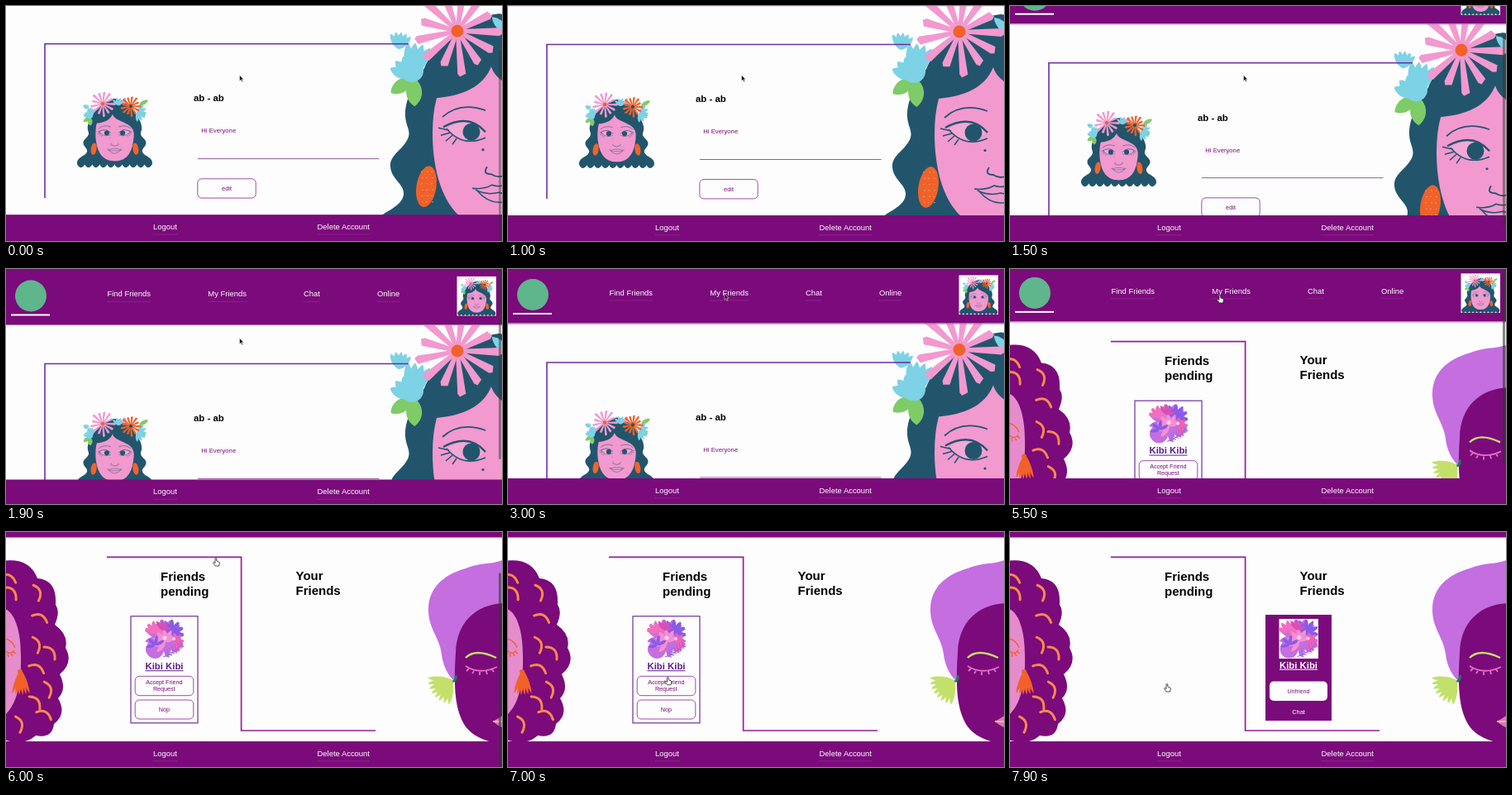
These frames come from a looping animation (600 px wide and 284 px high, 8 s). An HTML page:

```html
<!DOCTYPE html>
<html lang="en">
<head>
<meta charset="utf-8">
<title>Profile and friends</title>
<style>
html, body { margin: 0; width: 100%; height: 100%; overflow: hidden; background: #fdfdfd; }
svg { display: block; width: 600px; height: 284px; }
text { font-family: "Liberation Sans", Arial, sans-serif; white-space: pre; }
</style>
</head>
<body>
<svg id="stage" viewBox="0 0 600 284"></svg>
<script>
const PURPLE = '#7b0a7b', NAVY = '#22556c', PINK = '#f299cf', BLUE = '#7dd2e5',
  GREEN = '#7fcb68', ORANGE = '#f1612a', LINE = '#6f2da3', LILAC = '#c46ee0', LIME = '#c3e06b';
const PROFILE_MAX = 66.5, FRIENDS_MAX = 59.5;

// --- markup helpers ---
const rect = (x, y, w, h, fill, more = '') =>
  `<rect x="${x}" y="${y}" width="${w}" height="${h}" fill="${fill}" ${more}/>`;
const circle = (x, y, r, fill) => `<circle cx="${x}" cy="${y}" r="${r}" fill="${fill}"/>`;
const path = (d, fill) => `<path d="${d}" fill="${fill}"/>`;
const stroke = (d, color, w = 1, more = '') =>
  `<path d="${d}" fill="none" stroke="${color}" stroke-width="${w}" ${more}/>`;
const text = (x, y, s, size, fill, more = '') =>
  `<text x="${x}" y="${y}" font-size="${size}" fill="${fill}" ${more}>${s}</text>`;
const group = (transform, body, more = '') => `<g transform="${transform}" ${more}>${body}</g>`;
const bold = 'font-weight="700"', mid = 'text-anchor="middle"';
const button = (x, y, w, h) =>
  rect(x, y, w, h, 'none', 'rx="5" stroke="#963a9c" stroke-width=".9"');
const times = (n, f) => Array.from({ length: n }, (_, i) => f(i)).join('');

// Ribbon petals around a centre
const daisy = (x, y, n, r, w, fill) => times(n, i => {
  const len = r * (0.94 + 0.09 * Math.sin(i * 2.4));
  return group(`translate(${x} ${y}) rotate(${i * 360 / n + 8})`,
    path(`M-2 0L${-w / 2} ${-len + 3}L${w / 4} ${-len}L${w / 2} ${-len + 4}L2 0Z`, fill));
});
// Pointed petal or leaf growing from (x, y)
const leaf = (x, y, angle, len, w, fill) => group(`translate(${x} ${y}) rotate(${angle})`,
  path(`M0 0C${-w} ${-len * .3} ${-w * .8} ${-len * .8} 0 ${-len}C${w * .8} ${-len * .8} ${w} ${-len * .3} 0 0Z`, fill));
const fan = (x, y, from, to, n, len, w, fill) =>
  times(n, i => leaf(x, y, from + (to - from) * i / (n - 1), len, w, fill));

// --- woman with the flower crown ---
const eye =
  stroke('M528 135Q549 116 580 127', NAVY, 1.8) +
  path('M533 149Q560 131 580 152Q556 174 533 149Z', '#f3a8d6') +
  stroke('M529 147Q560 130 580 153', NAVY, 2.4) +
  stroke('M533 149Q552 172 580 160M536 151l-13 -3M537 154l-11 3M540 157l-8 7M545 161l-5 7', NAVY, 1.5) +
  circle(563, 153, 10.5, NAVY);
const mirror = body => group('translate(1192 0) scale(-1 1)', body);
const earring = `<ellipse cx="508.5" cy="219" rx="12" ry="25" fill="${ORANGE}" transform="rotate(9 508.5 219)"/>` +
  times(18, i => circle(503 + i % 3 * 6 + (i % 2), 201 + Math.floor(i / 3) * 7.3, .7, '#ffb184'));
const woman =
  path('M596 10C560 14 516 48 506 76C496 92 482 112 483 134C484 148 492 153 484 165C476 177 464 182 465 195C466 210 482 216 481 228C480 240 466 246 457 252C444 260 436 270 440 284' +
    times(10, () => 'q14 26 31.2 0') +
    'C756 270 748 260 735 252C726 246 712 240 711 228C710 216 726 210 727 195C728 182 716 177 708 165C700 153 708 148 709 134C710 112 696 92 686 76C676 48 632 14 596 10Z', NAVY) +
  path('M516 155Q516 130 521 112C562 108 579 93 587 74C598 110 674 104 676 155C676 190 668 232 644 254C626 268 612 270 596 270C580 270 566 268 548 254C524 232 516 190 516 155Z', PINK) +
  eye + mirror(eye) + circle(577, 174.5, 1.6, NAVY) +
  stroke('M582 195Q576 204 587 204Q596 210 605 204Q616 204 610 195', NAVY, 1.8) +
  stroke('M564 221Q578 223 588 217Q596 220 604 217Q614 223 628 221M570 224Q582 238 596 238Q610 238 622 224M568 223Q582 230 596 226Q610 230 624 223', NAVY, 1.5) +
  earring + mirror(earring) +
  fan(475, 53, -28, 45, 5, 21, 5, BLUE) +
  leaf(492, 88, 236, 32, 12, GREEN) + leaf(493, 87, 178, 35, 14, GREEN) +
  fan(490, 88, -65, -20, 3, 28, 9, BLUE) + fan(490, 88, -6, 32, 4, 43, 9, BLUE) + circle(491, 79, 14, BLUE) +
  fan(612, 38, -45, 45, 4, 34, 8, BLUE) + leaf(632, 34, 15, 30, 11, PINK) +
  leaf(698, 36, 62, 42, 12, GREEN) + leaf(690, 66, 110, 38, 13, GREEN) +
  fan(690, 66, 40, 180, 6, 40, 10, BLUE) +
  daisy(663, 41, 13, 44, 9, ORANGE) + circle(663, 41, 7, NAVY) +
  daisy(546, 31, 13, 54, 10, PINK) + circle(546, 31, 7.5, ORANGE);

// --- leafy avatar, 47 x 47 ---
const leafy =
  circle(12, 36, 11, LILAC) + fan(24, 22, -160, 170, 12, 24, 6, LILAC) +
  fan(12, 16, -70, 120, 7, 15, 4, '#f06fc0') + fan(32, 16, -60, 130, 7, 17, 4, '#8a5be8') +
  fan(25, 27, -140, 60, 7, 16, 4, '#f58fd2') + fan(36, 28, 0, 190, 6, 12, 4, '#ef62b8') +
  fan(20, 12, -30, 80, 4, 12, 3, '#d94fb4') + fan(13, 31, -100, 60, 4, 12, 3, '#8a5be8') +
  circle(24, 22, 2.5, '#ffd3ec') + circle(35, 23, 2, '#ffd3ec') +
  stroke('M22 45Q36 41 46 28', '#8a5be8', 1) +
  times(7, i => stroke(`M${25 + i * 3} ${44 - i * 2.1}l-1 -6m1 6l5 1`, '#9b6bea', 1.1));

// --- shared header and footer ---
const navLink = (x, w, y, label) => text(x, y, label, 9.45, '#fff') +
  stroke(`M${x} ${y + 6}h${w}`, '#a04aa0', .8, 'stroke-dasharray="1 1"');
const header = rect(0, -10, 600, 75.5, PURPLE) + rect(0, 65.5, 600, 1.2, '#b77ab9') +
  circle(30, 31, 19, '#5fb58c') + rect(6, 53, 47, 2, '#fff') +
  navLink(122.5, 52.5, 32, 'Find Friends') + navLink(244.3, 47, 32, 'My Friends') +
  navLink(360, 20, 32, 'Chat') + navLink(449, 28, 32, 'Online') +
  `<rect id="hover" x="244" y="36.6" width="47" height="1.5" fill="#fff"/>` +
  rect(545.5, 7.5, 47.5, 47.5, '#fff') + group('translate(481.7 11.5) scale(.147)', woman);
const footer = rect(0, 253, 600, 40, PURPLE) +
  navLink(178, 29, 270.8, 'Logout') + navLink(376.5, 63.5, 270.8, 'Delete Account');

// --- profile page ---
const profile = woman +
  stroke('M487 46.5H47V233', LINE, 1.6) +
  group(`translate(${117 - 546 / 3.45} ${119 - 31 / 3.45}) scale(${1 / 3.45})`, woman) +
  text(227, 116.3, 'ab - ab', 11.4, '#000', bold) +
  text(236.3, 154.3, 'Hi Everyone', 7.7, PURPLE) +
  rect(232, 185, 219.5, .9, '#8a4a92') +
  button(231.8, 209.6, 70.4, 23.3) + text(267, 223.7, 'edit', 7.4, PURPLE, mid);

// --- friends page ---
const curls = [[2, 57], [36, 73], [5, 74], [40, 105], [35, 136], [52, 146], [36, 166], [49, 190], [34, 206], [45, 222], [14, 232]];
const leftArt =
  path('M-5 35Q28 30 38 56Q62 58 60 88Q66 96 59 112Q76 124 72 140Q82 158 65 172Q74 190 63 201Q74 220 58 232Q56 250 36 246Q20 260 -5 250Z', PURPLE) +
  path('M-5 92C10 94 18 118 18 150C19 190 10 214 -5 224Z', '#e58dcc') +
  curls.map(([x, y], i) => group(`translate(${x} ${y}) rotate(${(i * 47) % 70 - 25})`,
    stroke('M-6 -7Q8 -7 7 8', '#f58a4c', 3, 'stroke-linecap="round"'))).join('') +
  stroke('M0 129Q8 132 11 140M0 144Q5 149 10 143M2 147l1 4M6 147l2 3M9 145l3 2', ORANGE, 1.4) +
  circle(17, 169, 3, ORANGE) + fan(18, 166, 160, 200, 6, 31, 3, ORANGE);
const rightArt =
  path('M605 32C590 40 575 36 556 44C528 52 512 68 511 92C510 116 525 128 527 148C529 166 540 182 552 186L605 140Z', LILAC) +
  path('M605 86C572 86 545 106 544 146C542 178 542 204 550 224C558 244 574 253 605 257Z', PURPLE) +
  stroke('M556 152Q568 140 593 152', LIME, 2.4) +
  stroke('M556 162Q573 173 594 163M560 165l-3 3M566 168l-2 3M573 169v4M581 168l1 4M588 166l2 3', '#e46fc4', 1.8) +
  path('M589 229Q597 224 605 219V238Q597 236 589 229Z', '#e46fc4') + stroke('M589 229H605', LIME, 1.8) +
  stroke('M544 173Q546 182 535 181L528 181', '#1d7a5c', 3) +
  fan(540, 179, 188, 275, 8, 30, 4.5, LIME);
const name = (x, y, fill) => text(x, y, 'Kibi Kibi', 11.35, fill, `${bold} ${mid}`) +
  rect(x - 23, y + 1.2, 46, 1, fill);
const pendingCard = rect(151, 101.8, 81, 129, '#fdfdfd', `stroke="${LINE}" stroke-width="1.2"`) +
  group('translate(168 106)', leafy, 'clip-path="url(#round)"') + name(191.5, 166, '#5c1f8c') +
  button(156.2, 174.3, 70.6, 23.4) + text(191.3, 184, 'Accept Friend', 7.2, PURPLE, mid) +
  text(191.3, 192, 'Request', 7.2, PURPLE, mid) +
  button(156.2, 203, 70.6, 23) + text(191.3, 217, 'Nop', 7.2, PURPLE, mid);
const friendCard = rect(309, 100, 80, 128, PURPLE) + rect(325.5, 105, 47.5, 48, '#fff') +
  group('translate(325.5 105.5)', leafy, 'clip-path="url(#square)"') + name(349, 164.5, '#fff') +
  rect(314, 180.5, 70, 23.5, '#fff', 'rx="5"') + text(349, 194.5, 'Unfriend', 7.2, PURPLE, mid) +
  text(349, 219.7, 'Chat', 7.4, '#fff', mid);
const friends = leftArt + rightArt +
  stroke('M122 30.3H284.6V240H447', '#93209a', 1.7) +
  text(187, 59, 'Friends', 15, '#000', bold) + text(187, 76.8, 'pending', 15, '#000', bold) +
  text(350.5, 58, 'Your', 15, '#000', bold) + text(350.5, 75.8, 'Friends', 15, '#000', bold) +
  `<g id="pending">${pendingCard}</g><g id="accepted">${friendCard}</g>`;

const arrow = '<path id="arrow" d="M0 0V7.2L1.7 5.7L2.8 8.3L4 7.8L2.9 5.2H5Z" fill="#111" stroke="#fff" stroke-width=".5"/>';
const hand = '<path id="hand" d="M-1 -4Q0 -5 .8 -4V-1L3.6 0Q4.6 .5 4.2 2.5L3.4 5H-.8L-3.4 1.4Q-3.4 .2 -2.2 .6L-1 1.6Z" fill="#fff" stroke="#222" stroke-width=".8"/>';

stage.innerHTML = `<defs><clipPath id="round"><rect width="47" height="48" rx="15"/></clipPath>
  <clipPath id="square"><rect width="47" height="47"/></clipPath></defs>` +
  rect(0, 0, 600, 284, '#fdfdfd') +
  `<g id="profile">${profile}</g><g id="friends">${friends}</g>
  <g id="head">${header}</g><g id="foot">${footer}</g>
  <rect id="thumb" x="596" width="3" rx="1.5" fill="#333"/>
  <g id="status">${rect(-3, 277, 201.5, 10, '#d9d3da', 'rx="2" stroke="#aaa" stroke-width=".6"')}
  ${text(1.5, 283, 'Waiting for swork-berlin.herokuapp.com...', 6.07, '#5d4a63')}</g>
  <g id="cursor">${arrow}${hand}</g>`;

// --- motion ---
const $ = id => document.getElementById(id);
const show = (id, on) => $(id).setAttribute('display', on ? 'inline' : 'none');
const move = (id, x, y) => $(id).setAttribute('transform', `translate(${x} ${y})`);

// Eased value through [time, value] keys
function track(t, keys) {
  let [t0, v0] = keys[0];
  for (const [t1, v1] of keys) {
    if (t < t1) {
      const p = Math.max(0, (t - t0) / (t1 - t0));
      return v0 + (v1 - v0) * p * p * (3 - 2 * p);
    }
    [t0, v0] = [t1, v1];
  }
  return v0;
}
// Scrolling bounces a little past either end
const SCROLL_UP = [[0, PROFILE_MAX + .8], [600, PROFILE_MAX], [1350, PROFILE_MAX], [1750, -3], [1900, -1.5], [2200, 0]];
const SCROLL_DOWN = [[5450, 0], [5900, FRIENDS_MAX]];
const CURSOR_X = [[2100, 282.5], [2900, 262], [3200, 262], [3700, 254], [6400, 254], [7100, 190]];
const CURSOR_Y = [[2100, 83.5], [2900, 30], [3200, 30], [3700, 36], [6400, 36], [7100, 188]];
const THUMB = [[500, .4], [800, 0], [1300, 0], [1400, .5], [2300, .5], [2600, 0],
  [5400, 0], [5500, .6], [6300, .6], [6600, 0]];

function draw(now) {
  const t = now % 8000, onFriends = t >= 5000;
  const max = onFriends ? FRIENDS_MAX : PROFILE_MAX;
  const scroll = track(t, onFriends ? SCROLL_DOWN : SCROLL_UP);
  const inside = Math.min(max, Math.max(0, scroll));
  show('profile', !onFriends);
  show('friends', onFriends);
  move(onFriends ? 'friends' : 'profile', 0, max - scroll);
  move('head', 0, -scroll);
  move('foot', 0, inside - scroll);

  const length = 284 * 284 / (284 + max);
  $('thumb').setAttribute('height', length);
  $('thumb').setAttribute('y', inside / max * (284 - length));
  $('thumb').setAttribute('opacity', track(t, THUMB));

  show('hover', t >= 3200 && !onFriends);
  show('status', t >= 4200 && !onFriends);
  show('pending', t < 7500);
  show('accepted', t >= 7500);

  const pointing = t >= 3200 && (t < 6450 || t >= 6950);
  show('hand', pointing);
  show('arrow', !pointing);
  move('cursor', track(t, CURSOR_X), track(t, CURSOR_Y));
}
const start = performance.now();
function tick() {
  draw(performance.now() - start);
  requestAnimationFrame(tick);
}
tick();
</script>
</body>
</html>
```
